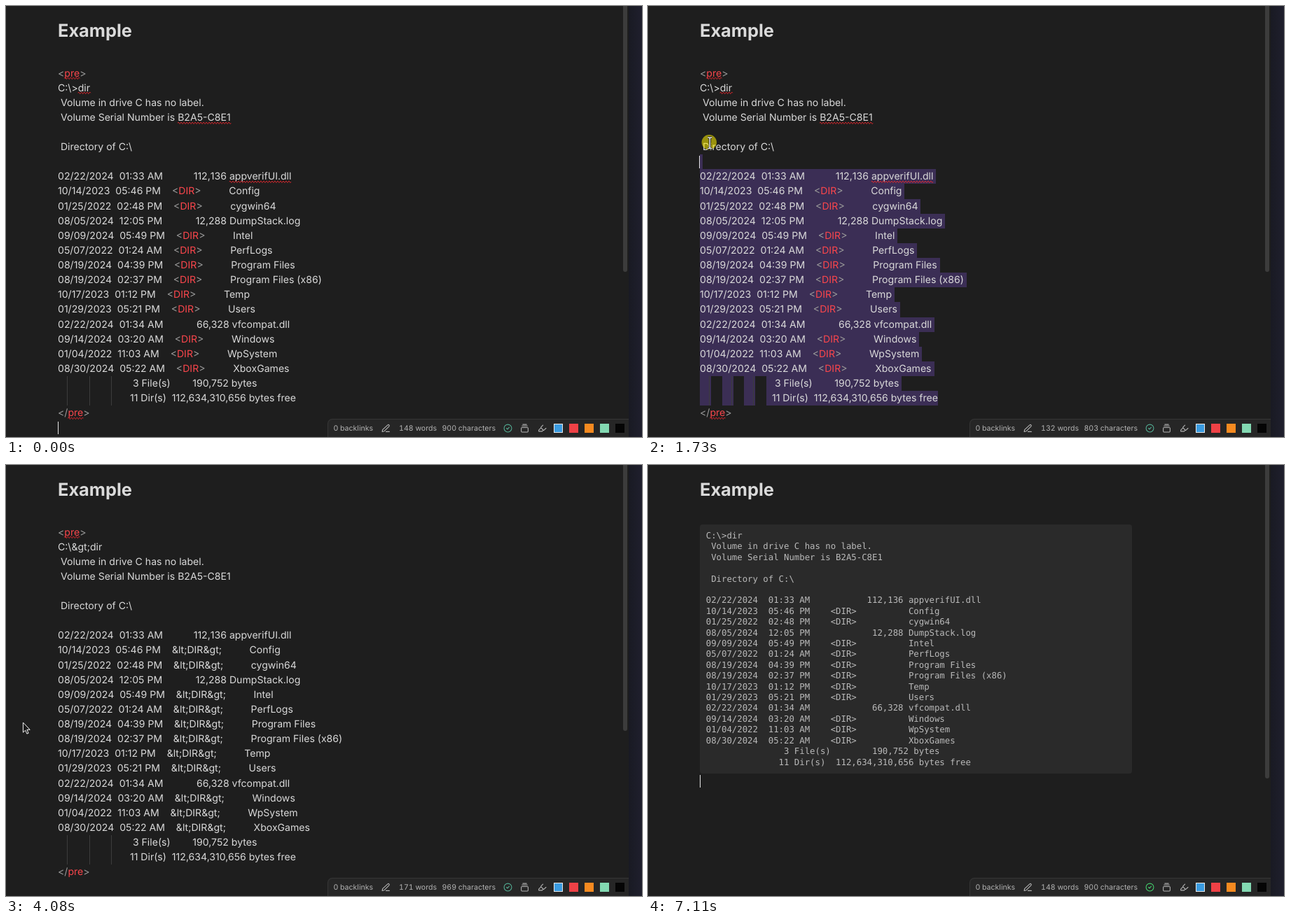
These frames come from a looping animation (908x616 px, 7210 ms). An HTML page:

```html
<!DOCTYPE html>
<html lang="en">
<head>
<meta charset="utf-8">
<title>Example</title>
<style>
  html, body { margin: 0; width: 100%; height: 100%; overflow: hidden; background: #1e1e1e; }
  #stage {
    position: relative; width: 908px; height: 616px; overflow: hidden;
    background: #1e1e1e; color: #dadada;
    font: 14.08px Inter, sans-serif; text-rendering: geometricPrecision;
  }
  #stage > *, .line, #sel div { position: absolute; }
  h1 { margin: 0; left: 74px; top: 15.8px; font-size: 25.37px; line-height: 40px; font-weight: 700; }
  .view, #sel, #over { left: 0; top: 0; width: 908px; height: 616px; }
  .line { left: 74px; height: 21.12px; line-height: 21.12px; white-space: pre; }
  .line i { display: inline-block; position: relative; width: 31.68px; font-style: normal; }
  .line i::before {
    content: ""; position: absolute; left: 13px; top: 0; width: 1px; height: 21.2px; background: #3c3c3c;
  }
  .line b { font-weight: 400; color: #fb464c; }
  .line s { text-decoration: none; color: #999; }
  .line em { font-style: normal; font-kerning: none; }
  #sel div { background: #3b2e55; }
  #block {
    left: 74px; top: 84.6px; width: 599.4px; margin: 0; padding: 9.4px 8.8px 8.2px; border-radius: 4px;
    background: #2a2a2a; color: #bababa;
    font: 12.32px/15.4px "DejaVu Sans Mono", monospace;
  }
  #caret { width: 1px; height: 18px; background: #e6e6e6; }
  #thumb { left: 881px; top: 0; width: 6px; background: #3c3c3c; border-radius: 0 0 3px 3px; }
  #edge { left: 889px; top: 0; width: 19px; height: 616px; background: linear-gradient(90deg, #191a23, #1f1f2d); }
  #bar {
    right: 19px; top: 590px; height: 26px; box-sizing: border-box; padding: 0 190px 0 7px;
    display: flex; align-items: center; white-space: pre;
    background: #262626; border: solid #363636; border-width: 1px 0 0 1px; border-radius: 7px 0 0 0;
    font-size: 10.56px; font-variant-numeric: tabular-nums; color: #b3b3b3;
  }
  #bar svg { fill: none; stroke: #b3b3b3; stroke-width: 2; stroke-linecap: round; stroke-linejoin: round; }
  #bar .pen { margin: 0 12px; }
  #words { margin-right: 7.5px; }
  #bar .tool { position: absolute; top: 6px; }
  #bar u { position: absolute; top: 6px; width: 13px; height: 13px; box-sizing: border-box; }
  #over { pointer-events: none; }
</style>
</head>
<body>
<div id="stage">
  <h1>Example</h1>
  <div id="sel"></div>
  <div id="raw" class="view"></div>
  <div id="safe" class="view"></div>
  <pre id="block"></pre>
  <div id="caret"></div>
  <div id="thumb"></div>
  <div id="edge"></div>
  <div id="bar">
    <span>0 backlinks</span>
    <svg class="pen" width="13" height="13" viewBox="0 0 24 24"><path d="M12 21h9M16.5 3.5a2.1 2.1 0 0 1 3.5 3.5L7 20l-5 1 1-5z"/></svg>
    <span id="words"></span><span id="chars"></span>
  </div>
  <svg id="over" viewBox="0 0 908 616">
    <path id="fold" d="M61.5 516.5l4 4 4-4" fill="none" stroke="#777" stroke-width="1.2"/>
    <g id="mouse">
      <circle id="spot" r="10.7" cx="-.5" cy="-.7" fill="#fff000" fill-opacity=".55"/>
      <path id="arrow" d="M.5.5v14.2l3.3-3 2.2 5 2.2-1-2.2-4.9h4.3z" fill="#1b1b1b" stroke="#f4f4f4"/>
      <g id="beam" fill="none">
        <path d="M-2.500-7.500h2l1 1 1-1h2M.5-6.500v14M-2.500 8h2l1-1 1 1h2" stroke="#111" stroke-width="3.2"/>
        <path d="M-2.500-7.500h2l1 1 1-1h2M.5-6.500v14M-2.500 8h2l1-1 1 1h2" stroke="#f4f4f4" stroke-width="1.5"/>
      </g>
    </g>
  </svg>
</div>
<script>
const LOOP = 7210, TOP = 85.5, ROW = 21.12, LEFT = 74, LAST = 22;
const $ = id => document.getElementById(id);
const show = (el, on) => { el.style.visibility = on ? "visible" : "hidden"; };
const esc = s => s.replace(/&/g, "&amp;").replace(/</g, "&lt;").replace(/>/g, "&gt;");

const entries = [
  "02/22/2024  01:33 AM|112,136|appverifUI.dll",
  "10/14/2023  05:46 PM||Config",
  "01/25/2022  02:48 PM||cygwin64",
  "08/05/2024  12:05 PM|12,288|DumpStack.log",
  "09/09/2024  05:49 PM||Intel",
  "05/07/2022  01:24 AM||PerfLogs",
  "08/19/2024  04:39 PM||Program Files",
  "08/19/2024  02:37 PM||Program Files (x86)",
  "10/17/2023  01:12 PM||Temp",
  "01/29/2023  05:21 PM||Users",
  "02/22/2024  01:34 AM|66,328|vfcompat.dll",
  "09/14/2024  03:20 AM||Windows",
  "01/04/2022  11:03 AM||WpSystem",
  "08/30/2024  05:22 AM||XboxGames"
].map(e => {
  const [date, size, name] = e.split("|");
  return date + (size ? size.padStart(18) : "    <DIR>".padEnd(18)) + " " + name;
});
const doc = [
  "C:\\>dir",
  " Volume in drive C has no label.",
  " Volume Serial Number is B2A5-C8E1",
  "",
  " Directory of C:\\",
  "",
  ...entries,
  " ".repeat(15) + "3 File(s)        190,752 bytes",
  " ".repeat(14) + "11 Dir(s)  112,634,310,656 bytes free"
];
$("block").textContent = doc.join("\n");

// Editor views
const indent = s => s.replace(/^( {4})+/, m => "<i>    </i>".repeat(m.length / 4));
const loosen = s => s.replace(/1(?=\d)/g, "<em>1</em>"); // no kerning after a 1 inside numbers
const tag = (open, name, bad) => `<s>${open}</s><b${bad ? ' class="bad"' : ""}>${name}</b><s>&gt;</s>`;
const typo = s => `<span class="bad">${s}</span>`;
const colour = s => esc(s)
  .replace("&lt;DIR&gt;", tag("&lt;", "DIR"))
  .replace(/dir$|B2A5-C8E1|appverifUI\.dll/, typo);

function fill(id, rows, closeBad) {
  const body = rows.map(r => loosen(indent(r)));
  const all = [tag("&lt;", "pre", true), ...body, tag("&lt;/", "pre", closeBad)];
  $(id).innerHTML = all.map((h, i) =>
    `<div class="line" style="top:${(TOP + i * ROW).toFixed(2)}px">${h}</div>`).join("");
  let waves = "";
  $(id).querySelectorAll(".bad").forEach(el => {
    const r = el.getBoundingClientRect();
    const row = Math.round((el.closest(".line").offsetTop - TOP) / ROW);
    const y = Math.round(TOP + row * ROW + 15.7) + 2.3;
    const bumps = "t2 0".repeat(Math.max(0, Math.round(r.width / 2) - 1));
    waves += `<path data-row="${row}" d="M${r.left} ${y}q1-2.6 2 0${bumps}"/>`;
  });
  $(id).insertAdjacentHTML("beforeend",
    `<svg width="908" height="616" style="position:absolute;left:0;top:0" fill="none" stroke="#e0262c">${waves}</svg>`);
}
fill("raw", doc.map(colour), true);
fill("safe", doc.map(s => esc(esc(s))), false);
const dirWave = $("raw").querySelector('path[data-row="1"]');

// Left and right edge of every character, by row
const edges = [...$("raw").querySelectorAll(".line")].map(line => {
  const out = [], range = document.createRange();
  const walk = document.createTreeWalker(line, NodeFilter.SHOW_TEXT);
  for (let n; (n = walk.nextNode());)
    for (let i = 0; i < n.length; i++) {
      range.setStart(n, i);
      range.setEnd(n, i + 1);
      const r = range.getBoundingClientRect();
      out.push([r.left, r.right]);
    }
  return out;
});
const xAt = (row, col) => {
  const e = edges[row];
  return col < e.length ? e[col][0] : e.length ? e[e.length - 1][1] : LEFT;
};

// Status bar tools
const icon = (x, d, id) => `<svg class="tool" ${id ? `id="${id}"` : ""} style="right:${889 - x - 6.5}px" width="13" height="13" viewBox="0 0 24 24"><path d="${d}"/></svg>`;
const swatches = ["#3a9be0", "#ef4146", "#f68a20", "#83d9b2", "#050505"];
$("bar").insertAdjacentHTML("beforeend",
  icon(716, "M2 12a10 10 0 1 0 20 0a10 10 0 1 0-20 0M8.500 12l2.500 2.500 4.500-5", "check") +
  icon(740, "M7 2h10M5 6h14M5 10h14a2 2 0 0 1 2 2v8a2 2 0 0 1-2 2H5a2 2 0 0 1-2-2v-8a2 2 0 0 1 2-2") +
  icon(765, "M9 11l-6 6v3h9l3-3M22 12l-4.600 4.600a2 2 0 0 1-2.800 0l-5.200-5.200a2 2 0 0 1 0-2.800L14 4") +
  swatches.map((c, i) => `<u style="right:${94 - i * 22}px;background:${c};${i ? "" : "border:1px solid #e8e8e8"}"></u>`).join(""));

// Pointer track: time, x, y
const track = [
  [330, 758, 594], [420, 620, 566], [500, 500, 547], [580, 440, 544], [670, 424, 560],
  [950, 424, 560], [1040, 406, 547], [1100, 391, 535], [1180, 376, 515], [1240, 361, 499],
  [1300, 311, 456], [1460, 211, 349], [1520, 169, 304], [1650, 112, 237], [1730, 88, 196],
  [1820, 68, 155], [1930, 59, 130], [2100, 56, 120], [3720, 56, 120], [3840, 46, 170],
  [3960, 28, 270], [4060, 20, 350], [4180, 42, 450], [4300, 90, 540], [4420, 122, 573],
  [4560, 128, 596], [5760, 128, 596], [5840, 230, 603], [5920, 400, 606], [5990, 566, 620]
];
function pointer(t) {
  const i = track.findIndex(k => k[0] > t);
  if (i < 0) return track[track.length - 1].slice(1);
  if (!i) return track[0].slice(1);
  const a = track[i - 1], b = track[i], p = (t - a[0]) / (b[0] - a[0]);
  return [a[1] + (b[1] - a[1]) * p, a[2] + (b[2] - a[2]) * p];
}

// Text position under the dragging pointer
function headAt(t) {
  const [x, y] = pointer(Math.max(950, Math.min(t, 2100)));
  const row = Math.max(1, Math.min(LAST, Math.floor((y - TOP) / ROW)));
  const e = edges[row];
  let col = e.findIndex(c => x < (c[0] + c[1]) / 2);
  if (col < 0) col = e.length;
  return { row, col };
}
const selected = h => [doc[h.row - 1].slice(h.col), ...doc.slice(h.row)].join("\n");

let selKey = "";
function drawSelection(h) {
  const key = h ? h.row + ":" + h.col : "";
  if (key === selKey) return;
  selKey = key;
  let html = "";
  for (let row = h ? h.row : LAST + 1; row <= LAST; row++) {
    const parts = [];
    const add = (l, r) => {
      const p = parts[parts.length - 1];
      if (p && l - p[1] < 1) p[1] = r; else parts.push([l, r]);
    };
    edges[row].slice(row === h.row ? h.col : 0).forEach(c => add(c[0], c[1]));
    const end = xAt(row, Infinity);
    if (row < LAST) add(end, end + 4);
    const y = Math.round(TOP + row * ROW), tall = Math.round(TOP + (row + 1) * ROW) - y;
    for (const [l, r] of parts)
      html += `<div style="left:${l}px;top:${y}px;width:${r - l}px;height:${tall}px"></div>`;
  }
  $("sel").innerHTML = html;
}

function counts(t) {
  if (t >= 5190) return [148, 900];
  if (t >= 3320) return [171, 969];
  if (t < 950) return [148, 900];
  const text = selected(headAt(Math.floor((t - 130) / 200) * 200 + 100));
  if (!text) return [148, 900];
  return [(text.match(/\d+(?:,\d+)+|[\w-]+/g) || []).length, text.length];
}

function caretAt(t, h) {
  const within = (a, b) => t >= a && t < b;
  const line = row => Math.round(TOP + row * ROW + 1.4);
  if (t < 400 || within(4690, 5160)) return [LEFT, line(24)];
  if (within(950, 2440) || within(3010, 3150)) return [Math.round(xAt(h.row, h.col) - 1), line(h.row)];
  if (within(3150, 3750) || within(4350, 4690)) return [Math.round(xAt(LAST, Infinity)), line(LAST)];
  if (within(5160, 5290) || within(5900, 6500) || t >= 7110) return [LEFT, 443];
  return null;
}

function draw(t) {
  const done = t >= 5160;
  show($("raw"), t < 3150);
  show($("safe"), t >= 3150 && !done);
  show($("block"), done);
  $("thumb").style.height = (done ? 448 : 380) + "px";

  const dragging = t >= 950 && t < 3150;
  const head = headAt(t - 60);
  drawSelection(dragging ? head : null);
  dirWave.style.display = dragging && head.row === 1 ? "none" : "";
  show($("fold"), dragging && head.row === 20);

  const c = caretAt(t, head);
  show($("caret"), c);
  if (c) { $("caret").style.left = c[0] + "px"; $("caret").style.top = c[1] + "px"; }

  const [w, n] = counts(t);
  $("words").textContent = w + " words";
  $("chars").textContent = n + " characters";
  $("check").style.stroke = t >= 5320 ? "#44cf6e" : "#53ae94";

  const [x, y] = pointer(t);
  const arrow = x < 72 || (y > 590 && x > 461);
  const seen = t >= 330 && t < 5990;
  $("mouse").setAttribute("transform", `translate(${x.toFixed(1)} ${y.toFixed(1)})`);
  show($("arrow"), seen && arrow);
  show($("beam"), seen && !arrow);
  show($("spot"), (t >= 950 && t < 2370) || (t >= 4660 && t < 4780));
}

const start = performance.now();
function tick() {
  draw((performance.now() - start) % LOOP);
  requestAnimationFrame(tick);
}
tick();
</script>
</body>
</html>
```
